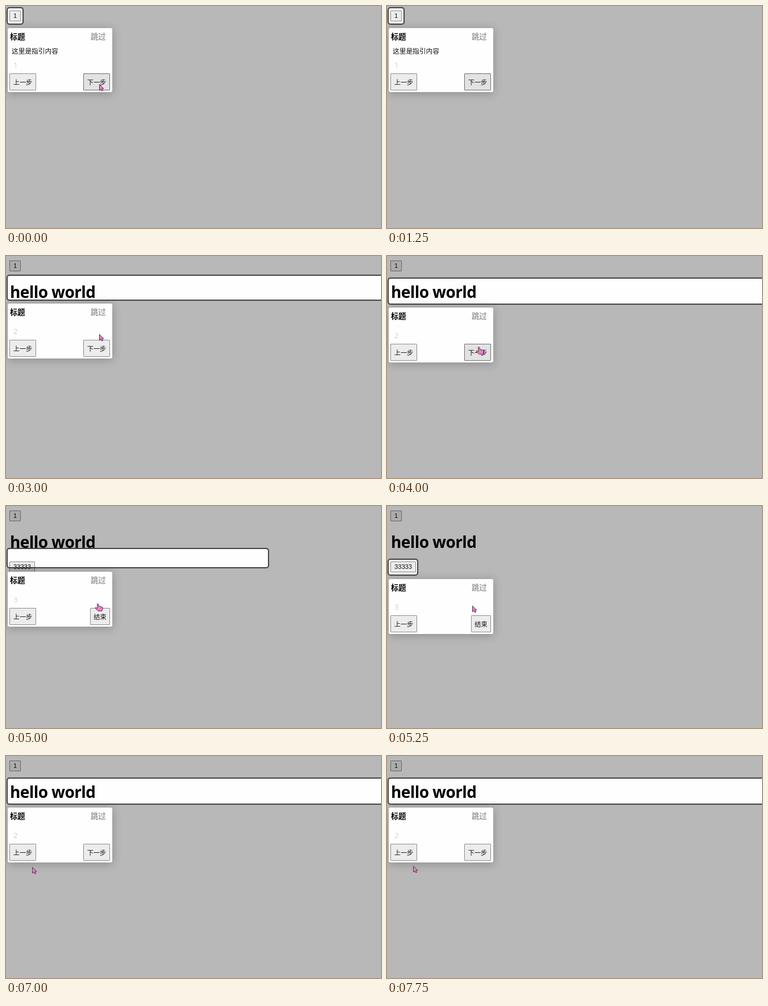
Recreate the animation shown at these times as an HTML page. Size 660 by 392 pixels, loop 8 s.

```html
<!DOCTYPE html>
<html lang="zh-CN">
<head>
<meta charset="utf-8">
<style>
html, body { margin: 0; width: 100%; height: 100%; overflow: hidden; }
#stage {
  position: relative; width: 660px; height: 392px; overflow: hidden;
  background: #fefefe; color: #111;
  font: 13.3px "Noto Sans CJK SC", "Noto Sans CJK", "Noto Sans", sans-serif;
}
#stage * { position: absolute; box-sizing: border-box; white-space: nowrap; }
h1 {
  left: 7px; top: 43px; margin: 0; color: #000; letter-spacing: -.6px;
  font: bold 28px/40px "Open Sans", "Noto Sans", sans-serif;
}
.btn {
  border: 1px solid #8c8c8c; border-radius: 1px; background: #ececec;
  font-size: 11.2px; text-align: center; height: 30px; line-height: 28px;
}
.btn.hover { background: #e2e2e2; border-color: #6c6c6c; }
.small { height: 19px; line-height: 17px; font-family: "Liberation Sans", sans-serif; }
#hole {
  border-radius: 3px;
  box-shadow: 0 0 1px 2px rgba(33, 33, 33, .8), 0 0 0 2000px rgba(0, 0, 0, .28);
}
#card {
  left: 3px; width: 184px; background: #fefefe; border-radius: 3px;
  box-shadow: 0 2px 16px rgba(33, 33, 33, .3);
}
#card > * { line-height: 20px; }
#card > .btn { line-height: 28px; bottom: 3px; }
#title, #skip { top: 5px; font-weight: bold; }
#title { left: 4px; color: #000; }
#skip { left: 146px; color: #a0a0a0; }
#text { left: 7px; top: 30px; font-size: 11.7px; }
#num { left: 10px; bottom: 38px; color: #d2d2ca; font-family: "Open Sans", "Noto Sans", sans-serif; }
#prev { left: 3px; width: 47px; }
#next { right: 4px; }
#cursor { left: 0; top: 0; width: 16px; height: 18px; overflow: visible; }
#cursor path { fill: #ea7fca; stroke: #5a3050; stroke-width: 1; stroke-linejoin: round; }
</style>
</head>
<body>
<div id="stage">
  <div class="btn small" style="left:6px;top:8px;width:20px">1</div>
  <h1>hello world</h1>
  <div class="btn small" style="left:6px;top:98px;width:45px">33333</div>
  <div id="hole"></div>
  <div id="card">
    <div id="title">标题</div>
    <div id="skip">跳过</div>
    <div id="text">这里是指引内容</div>
    <div id="num"></div>
    <div id="prev" class="btn">上一步</div>
    <div id="next" class="btn"></div>
  </div>
  <svg id="cursor"><path/></svg>
</div>
<script>
const LOOP = 8000, TICK = 250;
const el = id => document.getElementById(id);
const path = document.querySelector('#cursor path');

const shapes = {
  arrow: 'M.5 .5V11L3 8.7L4.8 12L6.5 11.2L5 8H8Z',
  hand: 'M.5 1.2Q1.5 -.2 2.6 1.2L3.6 5L7 5.6L10 6.8V10L8.5 13.5H2.5L-3 8.6Q-3.4 7.2-2 7.2L1 8.6Z'
};

// Highlight and card geometry of the three guide steps
const steps = [
  { x: 3, y: 4, right: 29, bottom: 31, card: 39 },
  { x: 3, y: 40, right: 1253, bottom: 84, card: 91 },
  { x: 3, y: 95, right: 53, bottom: 121, card: 129 }
];

// time, position between steps, shown step, hovered button, cursor, x, y
const keys = [
  [0, 0, 0, 'next', 'arrow', 164, 138],
  [750, 0, 0, 'next', 'hand', 161, 138],
  [1250, 0, 0, 'next', '', 0, 0],
  [2500, 0, 0, 'next', 'hand', 161, 136],
  [3000, .865, 1, '', 'arrow', 164, 138],
  [3250, 1, 1, '', 'arrow', 164, 144],
  [3500, 1, 1, 'next', 'hand', 160, 157],
  [4000, 1, 1, 'next', 'hand', 160, 160],
  [4500, 1, 1, 'next', 'hand', 160, 168],
  [4750, 1, 1, 'next', 'hand', 160, 172],
  [5000, 1.66, 2, '', 'hand', 160, 172],
  [5250, 2, 2, '', 'arrow', 150, 176],
  [5500, 2, 2, '', 'arrow', 104, 187],
  [5750, 2, 2, '', 'arrow', 62, 194],
  [6000, 2, 2, 'prev', 'hand', 44, 196],
  [6750, 1.34, 1, '', 'hand', 44, 196],
  [7000, 1, 1, '', 'arrow', 46, 196],
  [7250, 1, 1, '', 'arrow', 47, 211],
  [7500, 1, 1, '', 'arrow', 47, 206],
  [7750, 1, 1, '', 'arrow', 46, 194]
];

function place(node, box) {
  for (const side in box) node.style[side] = box[side] + 'px';
}

function draw(time) {
  const [, pos, step, hover, shape, x, y] = keys.findLast(k => k[0] <= time);
  const from = steps[Math.floor(pos)], to = steps[Math.ceil(pos)];
  const mix = name => from[name] + (to[name] - from[name]) * (pos % 1);
  const left = mix('x'), top = mix('y'), last = step === 2;

  place(el('hole'), { left, top, width: mix('right') - left, height: mix('bottom') - top });
  place(el('card'), { top: Math.round(mix('card')), height: step ? 97 : 113 });
  place(el('next'), { width: last ? 35 : 47 });
  el('text').hidden = step > 0;
  el('num').textContent = step + 1;
  el('next').textContent = last ? '结束' : '下一步';
  for (const id of ['prev', 'next']) el(id).classList.toggle('hover', hover === id);
  path.setAttribute('d', shapes[shape] || '');
  el('cursor').style.transform = `translate(${x}px, ${y}px)`;
}

const start = performance.now();
function loop() {
  const time = (performance.now() - start) % LOOP;
  draw(Math.floor(time / TICK) * TICK);
  requestAnimationFrame(loop);
}
loop();
</script>
</body>
</html>
```
